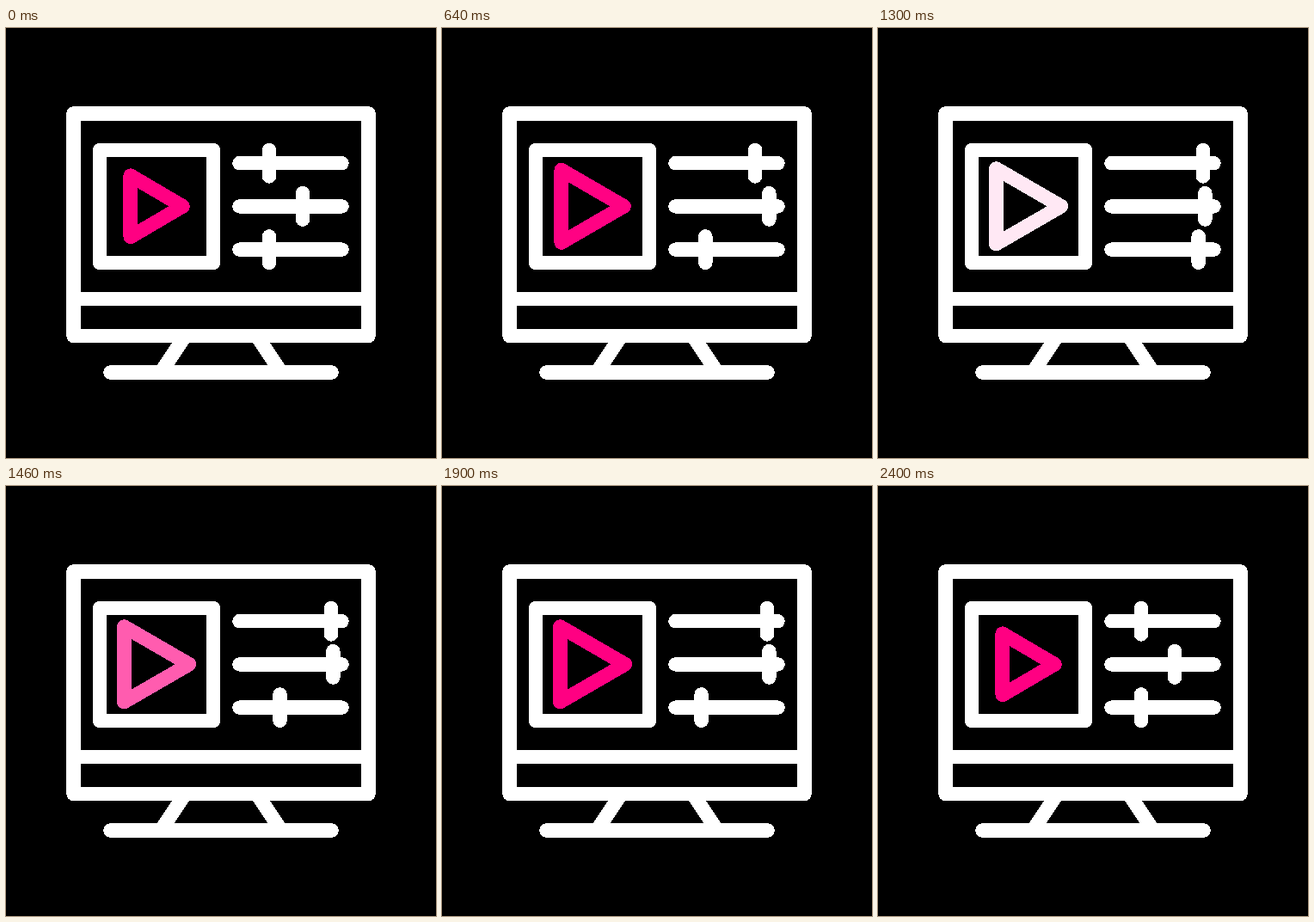
These frames come from a looping animation (500x500 px, 2.82 s). An HTML page:

```html
<!DOCTYPE html>
<html lang="en">
<head>
<meta charset="utf-8">
<title>Video settings</title>
<style>
  html, body { margin: 0; width: 100%; height: 100%; overflow: hidden; background: #000; }
  svg { display: block; width: 100vw; height: 100vh; }
</style>
</head>
<body>
<svg viewBox="0 0 500 500" fill="none" stroke="#fff" stroke-width="16.5" stroke-linecap="round" stroke-linejoin="round" shape-rendering="crispEdges">
  <path d="M78.5 99.5H421.5V358H78.5ZM78.5 315H421.5"/>
  <path d="M206.5 361L181.5 398M293.5 361L318.5 398" stroke-linecap="butt"/>
  <path d="M121.5 400.5H378.5"/>
  <rect x="109" y="142" width="132" height="131"/>
  <path id="sliders"/>
  <path id="play"/>
</svg>
<script>
const LOOP = 2820, STEP = 20;
const sliders = document.getElementById('sliders');
const play = document.getElementById('play');

const mix = (a, b, p) => a + (b - a) * p;

// Cubic ease in and out with handles at .42 and .58, solved by halving.
function ease(x) {
  let lo = 0, hi = 1;
  for (let i = 0; i < 24; i++) {
    const u = (lo + hi) / 2, v = 1 - u;
    const at = 3 * u * v * (0.42 * v + 0.58 * u) + u ** 3;
    if (at < x) lo = u; else hi = u;
  }
  return lo * lo * (3 - 2 * lo);
}

// Eased progress from 0 to 1 between two times.
const ramp = (t, from, to) => ease(Math.min(1, Math.max(0, (t - from) / (to - from))));

function draw(t) {
  const back = ramp(t, 2000, 2400);
  const grow = ramp(t, 0, 920) - back;
  const slide = ramp(t, 0, 600) - back;
  const white = ramp(t, 600, 1210) - ramp(t, 1210, 1640);
  const sweep = 78 * ramp(t, 615, 1200) - 88 * ramp(t, 1200, 1600) + 10 * ramp(t, 1600, 2160);

  const knobs = [306 + 72 * grow, 345 + 35.3 * slide, 306 + sweep];
  sliders.setAttribute('d', knobs.map((x, i) => {
    const y = 157.2 + 50.2 * i;
    return `M271.5 ${y}H390.5M${x} ${y - 15.2}v30.4`;
  }).join(''));

  const mid = 207.3, half = mix(35.7, 43.8, grow);
  const left = mix(144.7, 137.3, grow), right = mix(205.5, 213, grow);
  play.setAttribute('d', `M${left} ${mid - half}L${right} ${mid}L${left} ${mid + half}Z`);
  play.setAttribute('stroke', `rgb(255,${Math.round(255 * white)},${Math.round(mix(130, 255, white))})`);
}

const start = performance.now();
function tick() {
  const t = Math.max(0, performance.now() - start) % LOOP;
  draw(Math.floor(t / STEP) * STEP);
  requestAnimationFrame(tick);
}
tick();
</script>
</body>
</html>
```
